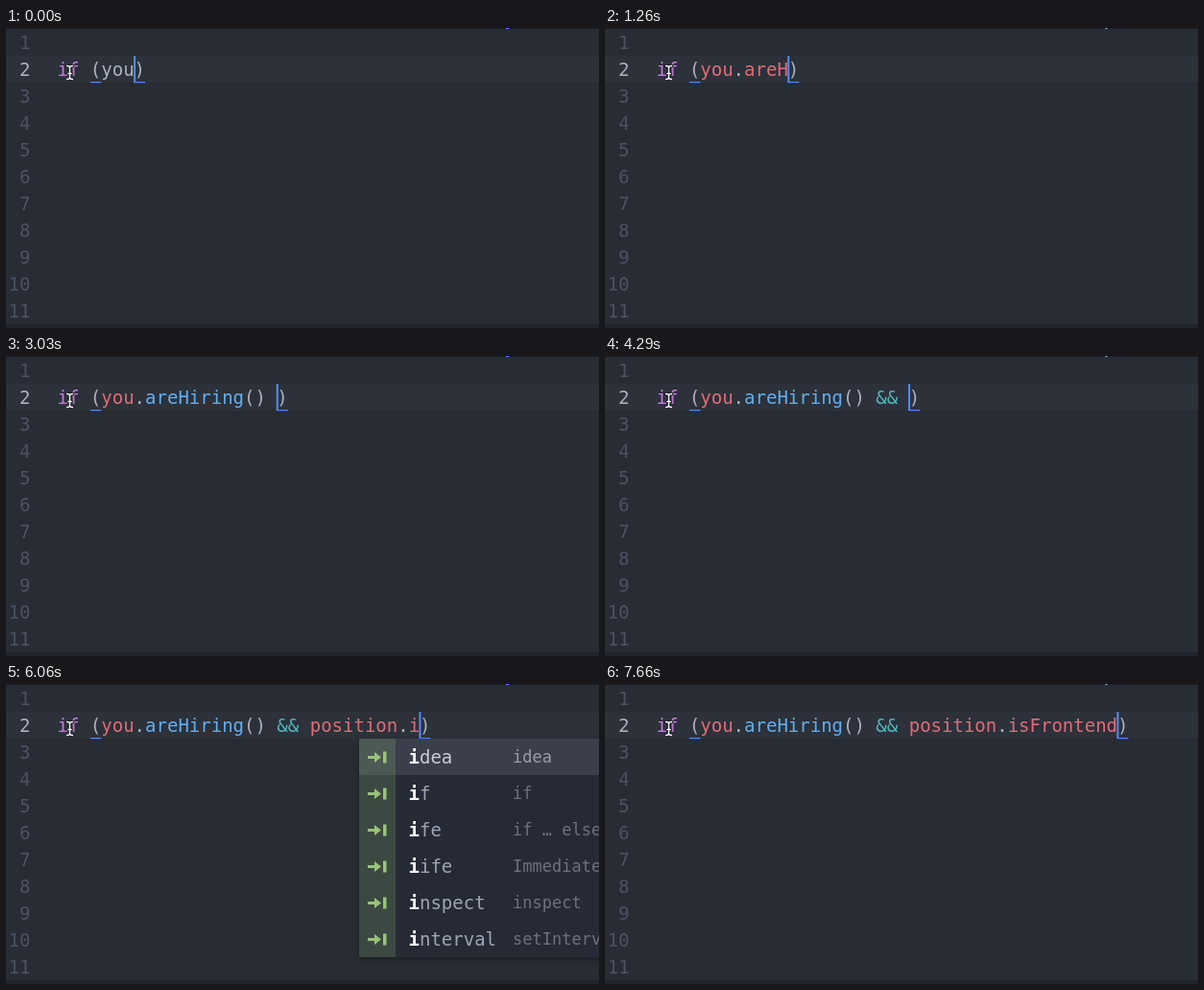
Recreate the animation shown at these times as an HTML page. Size 618 px wide and 313 px high, loop 8 s.

```html
<!DOCTYPE html>
<html lang="en">
<head>
<meta charset="utf-8">
<title>Typing in a code editor</title>
<style>
  html, body { margin: 0; width: 100%; height: 100%; overflow: hidden; background: #282c34; }
  svg { display: block; width: 618px; height: 313px; }
  text { font: 19px "DejaVu Sans Mono", monospace; white-space: pre; fill: #abb2bf; }
  .number { fill: #4b5263; text-anchor: end; }
  .number.active { fill: #abb2bf; }
  .keyword { fill: #c678dd; }
  .variable { fill: #e06c75; }
  .method { fill: #61afef; }
  .operator { fill: #56b6c2; }
  .word { fill: #9da5b4; }
  .word.selected { fill: #c8ccd4; }
  .match { font-weight: bold; fill: #fff; }
  .label { font-size: 17px; fill: #6b717d; }
  .label.selected { fill: #989da8; }
</style>
</head>
<body>
<svg viewBox="0 0 618 313">
  <defs>
    <filter id="shadow" x="-10%" y="-10%" width="120%" height="130%">
      <feDropShadow dx="0" dy="3" stdDeviation="3" flood-color="#000" flood-opacity=".3"/>
    </filter>
  </defs>
  <rect width="618" height="313" fill="#282c34"/>
  <rect y="29" width="618" height="28" fill="#2c313a"/>
  <rect width="618" height="1" fill="#1b1e24"/>
  <rect x="521" width="3" height="1" fill="#528bff"/>
  <rect y="309" width="618" height="4" fill="#21252b"/>
  <g id="numbers"></g>
  <g id="line"></g>
  <g id="pointer" fill="none" stroke-linecap="square">
    <path id="beam" d="M63.5 39.5q3 0 3 2q0-2 3-2M66.5 41.5V51.5M63.5 53.5q3 0 3-2q0 2 3 2M65 47.5H68"/>
  </g>
  <g id="popup"></g>
</svg>
<script>
const LOOP = 8000, LEFT = 53.5, BASELINE = 50, ROW = 38;
const PITCH = 19 * 0.602;
const $ = id => document.getElementById(id);
const columnX = column => LEFT + column * PITCH;
const escapeText = s => s.replace(/&/g, '&amp;').replace(/</g, '&lt;');
const span = (name, s) => `<tspan class="${name}">${escapeText(s)}</tspan>`;
const rect = (x, y, w, h, fill, extra = '') =>
  `<rect x="${x}" y="${y}" width="${w}" height="${h}" fill="${fill}" ${extra}/>`;

// A popup item is [word, label]; asterisks precede the matched letters.
const popups = {
  you: { column: 4, width: 261, items: [['*yell*ow-o*utline-button']] },
  are: { column: 8, width: 200, items: [['*a*rticl*e-*head*ing']] },
  po: { column: 23, width: 260, labelColumn: 5, snippet: true,
    items: [['*pr*oto', 'prototype'], ['*pr*om', 'new Promise']] },
  posit: { column: 23, width: 200, items: [['*pr*oject*s-l*is*t']] },
  i: { column: 32, width: 290, labelColumn: 8, snippet: true,
    items: [['*idea', 'idea'], ['*if', 'if'], ['*ife', 'if … else'],
      ['*iife', 'Immediately-invoked'], ['*inspect', 'inspect'], ['*interval', 'setInterval']] },
  is: { column: 32, width: 242, labelColumn: 7, snippet: true, items: [['*in*spect', 'inspect']] }
};

// Each step: start time, text typed before the caret, popup, inner brackets state.
const call = 'you.areHiring()', both = call + ' && ', end = both + 'position';
const steps = [
  [0, 'you'], [180, 'you', 'you'], [360, 'you.', 'you'], [720, 'you.are'],
  [1260, 'you.areH'], [1440, 'you.areHi', 'are'], [1620, 'you.areHir', 'are'],
  [1800, 'you.areHiri'], [1970, 'you.areHirin'], [2150, 'you.areHiring'],
  [2510, 'you.areHiring(', '', 'open'], [2680, 'you.areHiring(', '', 'open marked'],
  [2860, call, '', 'marked'], [3030, call + ' '],
  [3390, call + ' &'], [3750, call + ' &&'], [4290, both],
  [4650, both + 'p'], [4830, both + 'po', 'po'], [5000, both + 'posi', 'posit'],
  [5180, both + 'positi', 'posit'], [5350, both + 'positio'], [5530, end],
  [5890, end + '.'], [6060, end + '.i', 'i'], [6240, end + '.is', 'is'],
  [6600, end + '.isF'], [6780, end + '.isFr'], [6960, end + '.isFro'],
  [7130, end + '.isFron'], [7310, end + '.isFront'], [7490, end + '.isFronte'],
  [7660, end + '.isFrontend']
];

function highlight(code) {
  return code.replace(/if|[A-Za-z]+|&+|[^A-Za-z&]+/g, (token, at) => {
    const rest = code.slice(at + token.length);
    if (at === 0) return span('keyword', token);
    if (token[0] === '&') return span('operator', token);
    if (!/[A-Za-z]/.test(token)) return span('', token);
    if (rest[0] === '(') return span('method', token);
    return span(code[at - 1] === '.' || /^\.[A-Za-z]/.test(rest) ? 'variable' : '', token);
  });
}

function drawLine(typed, brackets = '') {
  const before = 'if (' + typed;
  const code = before + (brackets.includes('open') ? '))' : ')');
  const marks = brackets.includes('marked') ? [17, 18] : [3, code.length - 1];
  $('line').innerHTML =
    `<text x="${LEFT}" y="${BASELINE}">${highlight(code)}</text>` +
    marks.map(column => rect(columnX(column), 56, PITCH, 1.2, '#528bff')).join('') +
    rect(columnX(before.length) - 0.5, 29, 2, 28, '#528bff');
}

function drawPopup({ column, width, labelColumn, snippet, items }) {
  const textX = columnX(column), left = Math.round(textX - (snippet ? 52 : 11.5));
  const height = items.length * ROW;
  const shape = `rx="4"`;
  let out = rect(left, 57, width, height, '#282c34', shape + ' filter="url(#shadow)"');
  items.forEach(([word, label], row) => {
    const y = 57 + row * ROW, state = row ? '' : 'selected';
    if (!row) out += rect(left, y, width, ROW, '#3a3f4b', shape);
    if (snippet) {
      const cy = y + 19.5;
      out += rect(left, y, 38, ROW, '#98c379', 'opacity=".2"') +
        `<path d="M${left + 9} ${cy - 1.5}h7v-4l7 5.5l-7 5.5v-4h-7z" fill="#98c379"/>` +
        rect(left + 25, cy - 6, 3.5, 12, '#98c379');
    }
    const marked = word.replace(/\*(.)/g, (_, letter) => span('match', letter));
    out += `<text class="word ${state}" x="${textX}" y="${y + 26}">${marked}</text>`;
    if (label) {
      const x = textX + labelColumn * PITCH + 17;
      out += `<text class="label ${state}" x="${x}" y="${y + 25}">${label}</text>`;
    }
  });
  return out;
}

for (let n = 1; n <= 11; n++) {
  $('numbers').innerHTML +=
    `<text class="number ${n === 2 ? 'active' : ''}" x="25.5" y="${BASELINE + (n - 2) * 28}">${n}</text>`;
}
const beam = $('beam').getAttribute('d');
$('pointer').innerHTML =
  `<path d="${beam}" stroke="#15181d" stroke-width="3"/><path d="${beam}" stroke="#fff" stroke-width="1.3"/>`;

let shown = null;
function render(time) {
  const step = steps.findLast(([start]) => start <= time);
  if (step === shown) return;
  shown = step;
  const [, typed, popup, brackets] = step;
  drawLine(typed, brackets);
  $('popup').innerHTML = popup ? drawPopup(popups[popup]) : '';
}

const began = performance.now();
function tick() {
  render((performance.now() - began) % LOOP);
  requestAnimationFrame(tick);
}
tick();
</script>
</body>
</html>
```
